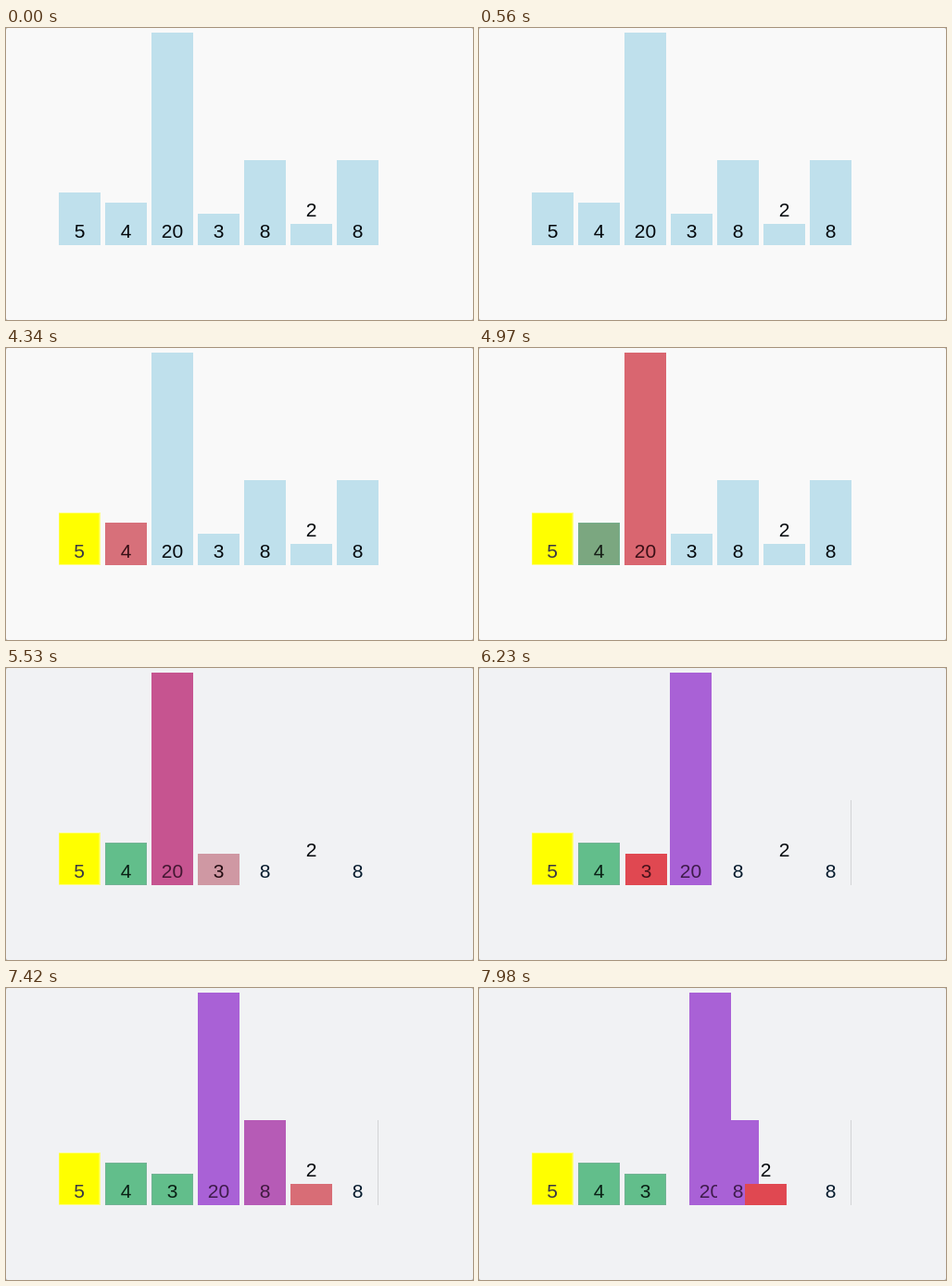
An HTML page that plays this animation: 504x316 px, repeating every 8 s.

```html
<!DOCTYPE html>
<html lang="en">
<head>
<meta charset="utf-8">
<title>Quicksort bars</title>
<style>
  :root {
    --blue: #bfe0ec;
    --yellow: #ff0;
    --red: #e04851;
    --green: #62be8b;
    --purple: #a961d6;
    --ink: #04080c;
    --on-yellow: #3c3a44;
    --on-red: #48121a;
    --on-green: #0a2015;
    --on-purple: #3f1c4c;
    --on-clear: #041a2c;
    --pale-edge: inset 0 0 0 1px #ffff80;
    --dull-edge: inset 0 0 0 1px #72b394;
  }
  html, body {
    margin: 0;
    width: 100%;
    height: 100%;
    overflow: hidden;
    background: #aaa;
  }
  .stage {
    position: relative;
    width: 504px;
    height: 316px;
    overflow: hidden;
    border-radius: 2px;
    background: #f9f9f9;
    font: 21px/21px "Liberation Sans", Arial, sans-serif;
  }
  .bar {
    position: absolute;
    left: calc(57px + 50px * var(--i));
    bottom: 81px;
    width: 45px;
    height: calc(11.5px * var(--v));
    background: var(--blue);
    color: var(--ink);
  }
  .bar span {
    position: absolute;
    bottom: 5px;
    width: 100%;
    text-align: center;
  }
  .bar .above { bottom: 28px; }

  /* 10 s timelines (1% = 100 ms), moved and looped by the script */
  .stage, .bar { animation: 10s ease both paused; }
  .stage  { animation-name: backdrop; }
  .pivot  { animation-name: pivot; }
  .four   { animation-name: four; }
  .twenty { animation-name: twenty, twenty-move; }
  .three  { animation-name: three, three-move; }
  .eight  { animation-name: eight; }
  .two    { animation-name: two, two-move; }
  .last   { animation-name: last; }

  @keyframes backdrop {
    0%, 54.59%  { background: #f9f9f9; }
    54.6%, 100% { background: #f1f2f4; }
  }
  @keyframes pivot {
    0%, 36.15%   { background: var(--blue); color: var(--ink); box-shadow: none; transform: none; }
    38.65%, 100% { background: var(--yellow); color: var(--on-yellow); box-shadow: var(--pale-edge); transform: translateX(-.5px); }
  }
  @keyframes four {
    0%, 42.3%     { background: var(--blue); color: var(--ink); box-shadow: none; }
    44.8%, 48.45% { background: var(--red); color: var(--on-red); box-shadow: none; }
    50.95%, 100%  { background: var(--green); color: var(--on-green); box-shadow: var(--dull-edge); }
  }
  @keyframes twenty {
    0%, 48.45%    { background: var(--blue); color: var(--ink); }
    50.95%, 54.6% { background: var(--red); color: var(--on-red); }
    57.1%, 100%   { background: var(--purple); color: var(--on-purple); }
  }
  @keyframes three {
    0%, 54.6%    { background: var(--blue); color: var(--ink); box-shadow: none; }
    57.1%, 66.9% { background: var(--red); color: var(--on-red); box-shadow: none; }
    69.4%, 100%  { background: var(--green); color: var(--on-green); box-shadow: var(--dull-edge); }
  }
  @keyframes eight {
    0%, 54.59%    { background: var(--blue); color: var(--ink); }
    54.6%, 66.89% { background: transparent; color: var(--on-clear); }
    66.9%         { background: var(--blue); color: var(--ink); }
    69.4%, 73.05% { background: var(--red); color: var(--on-red); }
    75.55%, 100%  { background: var(--purple); color: var(--on-purple); }
  }
  @keyframes two {
    0%, 54.59%    { background: var(--blue); }
    54.6%, 73.04% { background: transparent; }
    73.05%        { background: var(--blue); }
    75.55%, 100%  { background: var(--red); }
  }
  @keyframes last {
    0%, 54.59%    { background: var(--blue); color: var(--ink); box-shadow: none; }
    54.6%, 57.39% { background: transparent; color: var(--on-clear); box-shadow: none; }
    57.4%, 100%   { background: transparent; color: var(--on-clear); box-shadow: inset -1px 0 #d2d3d5; }
  }

  /* Swaps */
  @keyframes twenty-move {
    0%, 60.5%     { transform: none; animation-timing-function: ease-in-out; }
    62.5%, 79.18% { transform: translateX(50px); animation-timing-function: ease-in-out; }
    81.18%, 100%  { transform: translateX(150px); }
  }
  @keyframes three-move {
    0%, 60.5%   { transform: none; animation-timing-function: ease-in-out; }
    62.5%, 100% { transform: translateX(-50px); }
  }
  @keyframes two-move {
    0%, 79.18%   { transform: none; animation-timing-function: ease-in-out; }
    81.18%, 100% { transform: translateX(-100px); }
  }
</style>
</head>
<body>
<div class="stage">
  <div class="bar pivot" style="--i:0;--v:5"><span>5</span></div>
  <div class="bar four" style="--i:1;--v:4"><span>4</span></div>
  <div class="bar twenty" style="--i:2;--v:20"><span>20</span></div>
  <div class="bar three" style="--i:3;--v:3"><span>3</span></div>
  <div class="bar eight" style="--i:4;--v:8"><span>8</span></div>
  <div class="bar two" style="--i:5;--v:2"><span class="above">2</span></div>
  <div class="bar last" style="--i:6;--v:8"><span>8</span></div>
</div>
<script>
  // Cut the timelines at LOOP and hold each pose for STEP ms
  const LOOP = 8000, STEP = 70;
  const timelines = document.getAnimations();

  function tick() {
    const t = performance.now() % LOOP;
    const pose = Math.floor(t / STEP) * STEP;
    for (const a of timelines) a.currentTime = pose;
    requestAnimationFrame(tick);
  }
  tick();
</script>
</body>
</html>
```
